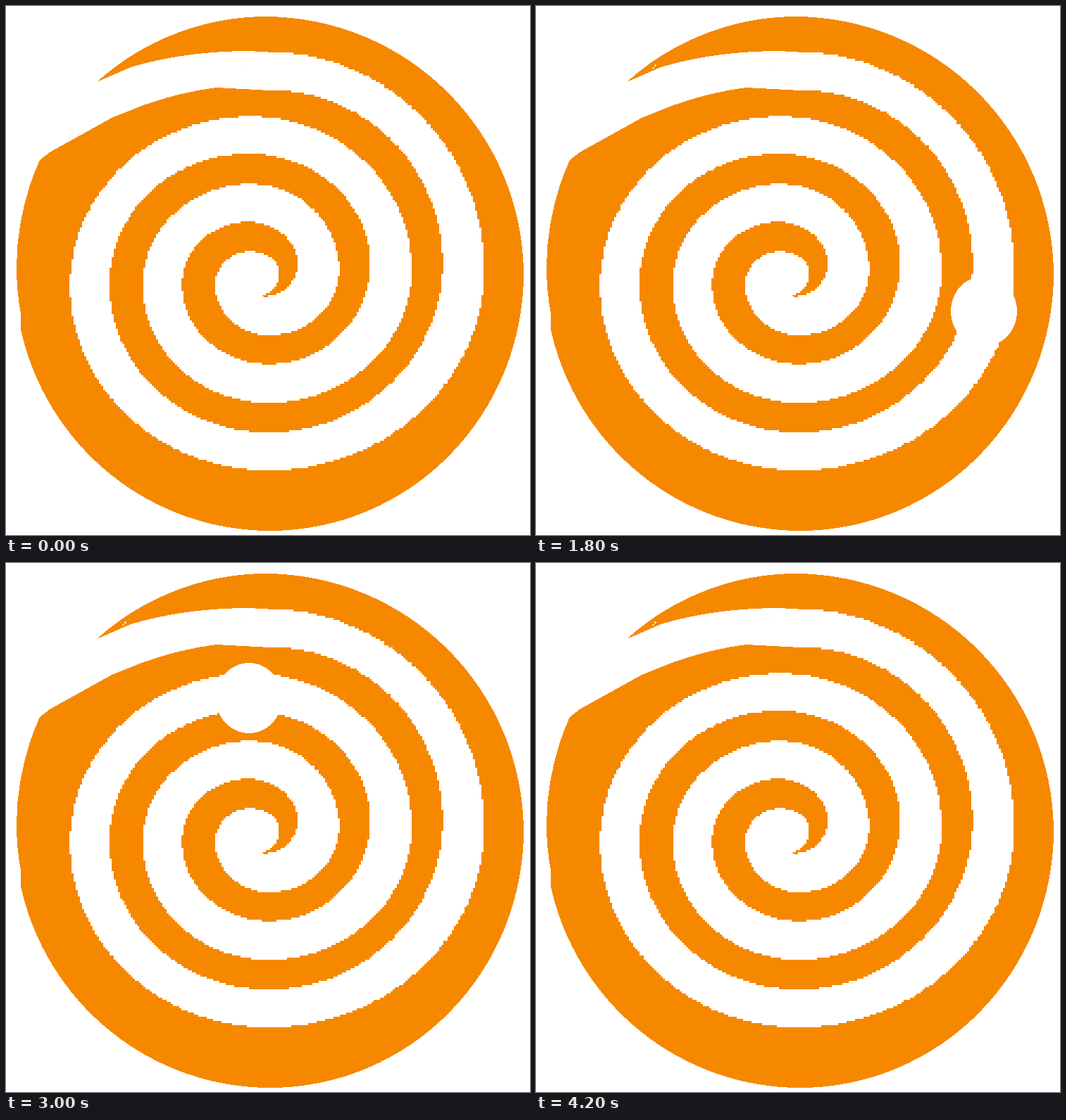
An HTML page that plays this animation: 744x752 px, repeating every 4.4 s.

```html
<!DOCTYPE html>
<html lang="en">
<head>
<meta charset="utf-8">
<title>Spiral maze</title>
<style>
  html, body { margin: 0; width: 100%; height: 100%; overflow: hidden; background: #fff; }
  svg { display: block; width: 744px; height: 752px; }
</style>
</head>
<body>
<svg viewBox="0 0 744 752" shape-rendering="crispEdges">
  <path id="maze" fill="#f68800"/>
  <rect x="339" y="83" width="1" height="1" fill="#fbd9ae"/>
  <path id="nick" d="M166 89L167 87M168 86L170 84" stroke="#fff" stroke-width="1.5"/>
  <ellipse id="ball" rx="47" ry="50" fill="#fff"/>
</svg>
<script>
const LOOP = 4400, START = 300, STEP = 100, GRID = 3;
const CX = 370, CY = 380, TURN = 2 * Math.PI;
const byId = id => document.getElementById(id);
const snap = v => Math.round(v / GRID) * GRID;

// Extreme points of a spiral edge: the first turn's top, right, bottom and left,
// moved inwards by dx, dy with every further turn.
function spiral(start, [top, right, bottom, left], dx, dy, count, end) {
  const pts = [start];
  for (let k = 1; k < count; k++) {
    const n = Math.floor(k / 4);
    pts.push([
      [top[0], top[1] + n * dy],
      [right[0] - n * dx, right[1]],
      [bottom[0], bottom[1] - n * dy],
      [left[0] + n * dx, left[1]]
    ][k % 4]);
  }
  return pts.concat(end);
}

// Joins the points with quarter ellipses cut into small stairs.
function stairs(pts) {
  const out = [pts[0]];
  let [lx, ly] = pts[0];
  for (let i = 0; i + 1 < pts.length; i++) {
    const [x0, y0] = pts[i], [x1, y1] = pts[i + 1];
    const flat = i % 2 === 0;
    for (let n = 1; n <= 160; n++) {
      const a = n / 160 * TURN / 4;
      const s = Math.sin(a), c = 1 - Math.cos(a);
      const x = snap(x0 + (x1 - x0) * (flat ? s : c));
      const y = snap(y0 + (y1 - y0) * (flat ? c : s));
      if (x === lx && y === ly) continue;
      out.push([x, ly], [x, y]);
      lx = x;
      ly = y;
    }
  }
  return out;
}

const nearEdge = spiral([375, 120],
  [[343, 113], [620, 367], [374, 606], [147, 395]], 103, 97, 10, [[366, 413]]);
const farEdge = spiral([368, 65],
  [[346, 61], [679, 376], [374, 660], [91, 396]], 103, 96, 13, [[388, 378], [364, 410]]);

const line = pts => "L" + pts.map(p => p.join(" ")).join("L");

byId("maze").setAttribute("d",
  "M129 108A362 365 0 0 1 370 15A368 368 0 0 1 735 380" +
  "A360 366 0 0 1 375 746A363 366 0 0 1 21 460V437" +
  "C17 415 15 395 15 370C15 318 28 262 48 219" +
  "L62 208L150 159L195 141Q250 122 298 116" +
  line(stairs(nearEdge)) +
  line(stairs(farEdge).reverse()) +
  "L340 64Q250 65 177 87Z");

// Key places of the ball as [step, x, y]; it winds around the centre between them.
const keys = [
  [0, 78, 160], [3, 283, 92], [5, 375, 89], [9, 533, 147], [11, 618, 253],
  [15, 636, 434], [17, 480, 612], [22, 120, 426], [23, 117, 387], [27, 345, 192],
  [29, 495, 257], [31, 449, 520], [33, 237, 390], [35, 420, 424], [38, 338, 385]
];
let last = -TURN;
const polar = keys.map(([step, x, y]) => {
  let angle = Math.atan2(y - CY, x - CX);
  while (angle < last) angle += TURN;
  last = angle;
  return { step, angle, r: Math.hypot(x - CX, y - CY) };
});

function place(step) {
  const i = Math.max(1, polar.findIndex(k => k.step >= step));
  const a = polar[i - 1], b = polar[i];
  const f = (step - a.step) / (b.step - a.step);
  const angle = a.angle + (b.angle - a.angle) * f;
  const r = a.r + (b.r - a.r) * f;
  return [CX + r * Math.cos(angle), CY + r * Math.sin(angle)];
}

const ball = byId("ball"), nick = byId("nick");
const show = (el, on) => el.setAttribute("visibility", on ? "visible" : "hidden");

function draw(t) {
  const step = Math.floor((t - START) / STEP);
  const on = step >= 0 && step <= keys[keys.length - 1][0];
  show(ball, on);
  show(nick, step >= 2);
  if (on) {
    const [x, y] = place(step);
    ball.setAttribute("cx", x);
    ball.setAttribute("cy", y);
  }
}

const begin = performance.now();
function tick() {
  draw((performance.now() - begin) % LOOP);
  requestAnimationFrame(tick);
}
tick();
</script>
</body>
</html>
```
